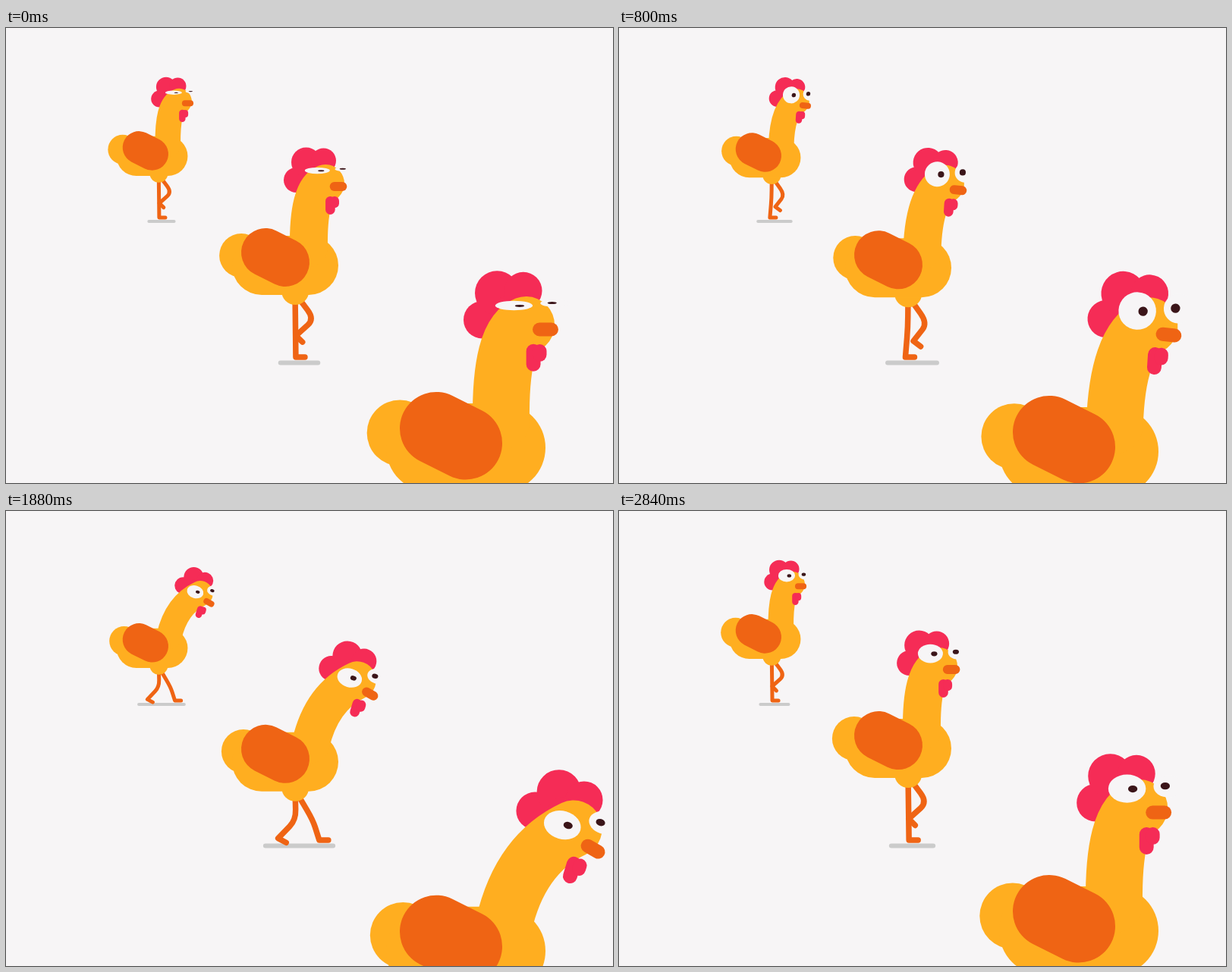
These frames come from a looping animation (800 px wide and 600 px high, 2880 ms). An HTML page with a canvas:

```html
<!DOCTYPE html>
<html lang="en">
<head>
<meta charset="utf-8">
<title>Walking chickens</title>
<style>
  html, body { margin: 0; width: 100%; height: 100%; overflow: hidden; background: #f7f5f6; }
  canvas { display: block; }
</style>
</head>
<body>
<canvas id="stage" width="800" height="600"></canvas>
<script>
const ctx = document.getElementById('stage').getContext('2d');
const LOOP = 2880, STEP = 720, TICK = 40, BLINK = 960;
const COLOR = {
  paper: '#f7f5f6', body: '#ffae20', wing: '#ef6414', red: '#f52c56',
  pupil: '#3b1519', shadow: '#cbcbcb'
};
const FLOCK = [
  { scale: 0.67, x: -54, y: -40.8 },
  { scale: 1, x: 0, y: 0 },
  { scale: 1.5, x: 54, y: 84 }
];

function disc(x, y, rx, color, ry = rx) {
  ctx.fillStyle = color;
  ctx.beginPath();
  ctx.ellipse(x, y, rx, ry, 0, 0, Math.PI * 2);
  ctx.fill();
}

function stroke(width, color, trace) {
  ctx.lineWidth = width;
  ctx.strokeStyle = color;
  ctx.beginPath();
  trace();
  ctx.stroke();
}

function line(x1, y1, x2, y2, width, color) {
  stroke(width, color, () => { ctx.moveTo(x1, y1); ctx.lineTo(x2, y2); });
}

// Draws with the origin moved to x, y and turned by some degrees
function placed(x, y, degrees, draw) {
  ctx.save();
  ctx.translate(x, y);
  ctx.rotate(degrees * Math.PI / 180);
  draw();
  ctx.restore();
}

function drawLeg(phase, hipY) {
  const turn = Math.PI * phase / STEP;
  const side = Math.sin(turn);
  const reach = Math.sin(Math.PI / 2 * Math.abs(side) ** 2.5);
  const raised = Math.max(0, Math.cos(turn));   // 0 while the foot is planted

  const hipX = 381;
  const ankleX = 382 + reach * (side > 0 ? 33 : -25);
  const ankleY = 434 - 28.5 * raised ** 3;
  const kneeX = (hipX + ankleX) / 2 + 8 * reach + 25 * raised ** 2;
  const kneeY = (hipY + ankleY) / 2 + 7 * reach + 6 * raised ** 2;
  const tilt = 0.8 * Math.max(0, Math.cos(turn + 0.2));
  const round = 0.35;

  stroke(7.5, COLOR.wing, () => {
    ctx.moveTo(hipX, hipY);
    ctx.lineTo(kneeX + (hipX - kneeX) * round, kneeY + (hipY - kneeY) * round);
    ctx.quadraticCurveTo(kneeX, kneeY,
      kneeX + (ankleX - kneeX) * round, kneeY + (ankleY - kneeY) * round);
    ctx.lineTo(ankleX, ankleY);
    ctx.lineTo(ankleX + 12 * Math.cos(tilt), ankleY + 12 * Math.sin(tilt));
  });
}

function drawEye(x, y, r, pupilX, pupilY, tilt, open) {
  placed(x, y, tilt, () => disc(0, 0, r, COLOR.paper, r * open));
  placed(pupilX, pupilY, tilt, () => disc(0, 0, 4.1, COLOR.pupil, 4.1 * Math.max(open, 0.1)));
}

function drawChicken(phase, open) {
  const angle = 2 * Math.PI * phase / STEP;
  const lean = Math.max(0, (1 - Math.cos(angle)) / 2 - 0.007);
  const drop = 22.7 * lean ** 1.1;

  const halfShadow = 24.3 + 22 * Math.abs(Math.sin(Math.PI * (phase - 13) / STEP));
  line(386.5 - halfShadow, 441.5, 386.5 + halfShadow, 441.5, 6, COLOR.shadow);

  drawLeg(phase, 350 + drop);
  drawLeg(phase + STEP, 350 + drop);

  // comb
  const combX = 64 * lean;
  placed(399 + combX, 184 + 0.0056 * combX ** 2, 28.5 * lean, () => {
    disc(-16.5, 16.5, 16.5, COLOR.red);
    disc(-3.5, -7, 19.5, COLOR.red);
    disc(19.5, -9, 16.5, COLOR.red);
    disc(6, 8, 13, COLOR.red);
  });

  // body, tail and neck
  disc(310 + 4.3 * lean + 0.7 * Math.sin(angle), 300 + 0.95 * drop, 29, COLOR.body);
  disc(381.2, 347 + drop, 18, COLOR.body);
  line(337, 313 + drop, 399, 313 + drop, 78, COLOR.body);
  const headX = 52 * lean;
  stroke(50, COLOR.body, () => {
    ctx.moveTo(399 + 3 * lean, 290 + drop);
    ctx.quadraticCurveTo(398 + 22 * lean, 214 + 39 * lean,
      421 + headX, 205 + 0.0105 * headX ** 2);
  });
  line(342, 296 + drop, 368, 309 + drop, 64, COLOR.wing);

  // face
  const faceX = 53 * lean, faceY = 0.456 * faceX + 0.007 * faceX ** 2;
  const wattleX = 42 * lean;
  const tilt = 20 * lean;
  drawEye(446.5 + faceX, 186 + faceY, 13, 443.8 + faceX, 185.7 + faceY, tilt, open);
  drawEye(410.3 + faceX, 188 + faceY, 16.5, 415.3 + faceX, 188.3 + faceY, tilt, open);
  placed(430 + wattleX, 234 + 0.306 * wattleX + 0.0142 * wattleX ** 2, 21 * lean, () => {
    line(-2.6, -5.8, -2.6, 5.6, 12.6, COLOR.red);
    line(3, -6, 3, -2.8, 12, COLOR.red);
  });
  placed(438 + 0.98 * faceX, 209 + faceY, 37 * lean, () => line(-5.3, 0, 5.3, 0, 12, COLOR.wing));
}

function drawScene(t) {
  // the first steps run slightly ahead while the body is low
  const ahead = Math.max(0, 1 - t / 2400) * 28 * Math.sin(Math.PI * t / STEP) ** 2;
  const phase = t + 18 + ahead;

  const fromBlink = Math.abs((t - 40 + LOOP + BLINK / 2) % BLINK - BLINK / 2);
  const open = fromBlink < 120 ? (1 - Math.cos(Math.PI * fromBlink / 120)) / 2 : 1;

  ctx.setTransform(1, 0, 0, 1, 0, 0);
  ctx.fillStyle = COLOR.paper;
  ctx.fillRect(0, 0, 800, 600);
  ctx.lineCap = ctx.lineJoin = 'round';
  for (const { scale, x, y } of FLOCK) {
    ctx.setTransform(scale, 0, 0, scale, x, y);
    drawChicken(phase, open);
  }
}

const start = performance.now();
function tick() {
  const t = (performance.now() - start) % LOOP;
  drawScene(Math.floor(t / TICK) * TICK);
  requestAnimationFrame(tick);
}
tick();
</script>
</body>
</html>
```
